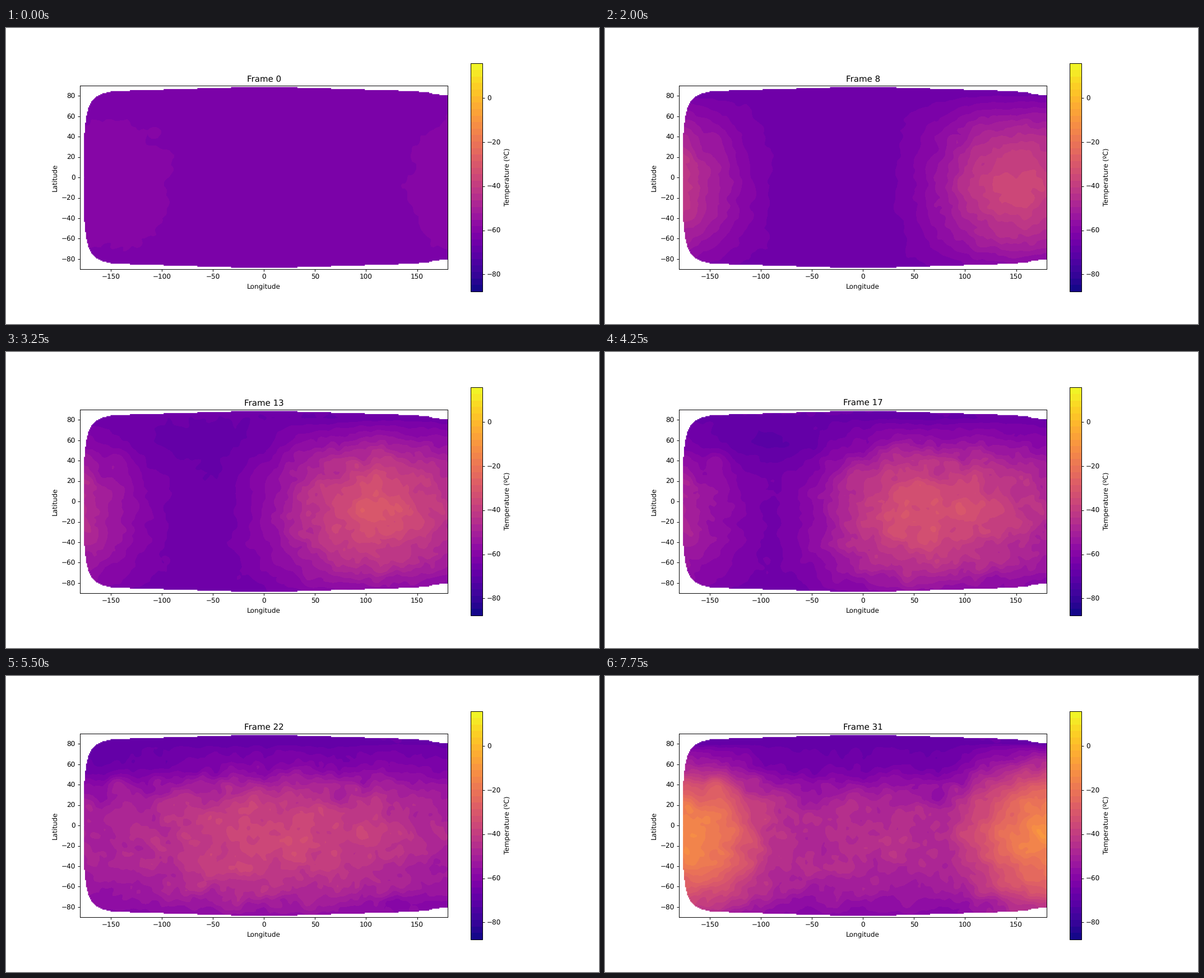
Recreate the animation shown at these times as a matplotlib script. Size 1058 by 529 pixels, loop 8 s.

```python
import numpy as np
import matplotlib.pyplot as plt
from matplotlib.animation import FuncAnimation

plt.rcParams.update({"text.hinting": "none", "text.hinting_factor": 1})

FRAMES, INTERVAL = 32, 250
LEVELS = np.linspace(-87.7, 15.6, 36)
LON = np.linspace(-180, 180, 181)
LAT = np.linspace(-90, 90, 91)
X, Y = np.meshgrid(LON, LAT)


def sunlight(step):
    sun = np.interp(step, [0, 17, 24, 31], [-154, -366, -510, -562])
    return np.maximum(0, np.cos(np.radians(LON - sun)))


def simulate():
    """Heat gained along the equator: fast warming by day, slow loss."""
    heat = [3 * sunlight(0)]
    for step in range(1, FRAMES):
        gain = np.interp(step, [15, 20], [4.6, 5.6])
        heat.append(heat[-1] * 0.96 + gain * sunlight(step))
    return heat


def smooth_noise(rng, degrees):
    fy = np.fft.fftfreq(LAT.size, 2)[:, None]
    fx = np.fft.fftfreq(LON.size, 2)[None, :]
    blur = np.exp(-2 * (np.pi * degrees) ** 2 * (fx ** 2 + fy ** 2))
    field = np.fft.ifft2(np.fft.fft2(rng.normal(size=X.shape)) * blur).real
    return field / field.std()


def bump(lon, lat, width, height):
    return np.exp(-((X - lon) / width) ** 2 - ((Y - lat) / height) ** 2)


rng = np.random.default_rng(12)
TEXTURE = 1.2 * smooth_noise(rng, 5) + 0.9 * smooth_noise(rng, 2.4)
HEAT = simulate()
COLD_BELT = np.exp(-((Y - 58) / 22) ** 2) * (1 - 0.5 * bump(145, 55, 45, 60))
TERRAIN = (7 * bump(-143, 42, 12, 9) - 6 * bump(130, -75, 40, 8)
           + 5 * bump(28, -17, 18, 10) - 5 * bump(75, 29, 9, 8)
           + 4 * bump(-25, -40, 16, 10) - 5 * bump(165, -40, 12, 9))


def temperature(step):
    night = -66 + 3.5 * np.exp(-step / 2)
    centre = np.interp(step, [4, 22], [-7, -10])
    flatness = np.interp(step, [4, 22], [1, 0.7])
    slant = np.maximum(0, np.cos(np.radians(Y - centre))) ** flatness
    heat = HEAT[step] * slant
    rough = 0.1 + 0.9 * min(step / 15, 1) * np.clip(heat / 18, 0.15, 1)
    field = night + heat + rough * TEXTURE
    field -= COLD_BELT * np.interp(step, [8, 13, 22], [0, 2.5, 9])
    field += TERRAIN * np.interp(step, [5, 22], [0, 1])
    return np.clip(field, LEVELS[0], LEVELS[-1])


def coverage(lon):
    """Northern limit of the data, in whole-degree steps."""
    limit = 89 - np.floor(np.abs(lon) / 32.9)
    limit -= np.maximum(0, np.floor((lon - 142) / 10))
    gap = np.maximum(lon + 179.5, 0.1)
    corner = np.where(gap < 3, 0, np.round(90 - 160 / gap))
    return np.minimum(limit, corner)


fig, ax = plt.subplots(figsize=(12, 6), dpi=88.1667)
ax.set_aspect("equal")


def contours(step):
    return ax.contourf(X, Y, temperature(step), levels=LEVELS, cmap="plasma",
                       vmin=LEVELS[0], vmax=LEVELS[-1])


filled = contours(0)
bar = fig.colorbar(filled, ax=ax, ticks=range(-80, 1, 20))
bar.minorticks_off()
bar.set_label("Temperature (ºC)")

columns = np.arange(-180, 182)
top = coverage(columns)
for inner, outer in ((top, 90), (0.7 - top, -90)):
    ax.fill_between(columns - 0.5, inner, outer, step="post", color="white",
                    lw=0, zorder=1.5)

ax.set(xlim=(-180, 180), ylim=(-90, 90), xlabel="Longitude",
       ylabel="Latitude", xticks=range(-150, 151, 50),
       yticks=range(-80, 81, 20))
title = ax.set_title("Frame 0")


def update(step):
    global filled
    filled.remove()
    filled = contours(step)
    title.set_text(f"Frame {step}")
    return filled, title


anim = FuncAnimation(fig, update, frames=FRAMES, interval=INTERVAL,
                     repeat=True, repeat_delay=0, blit=False)
plt.show()
```
